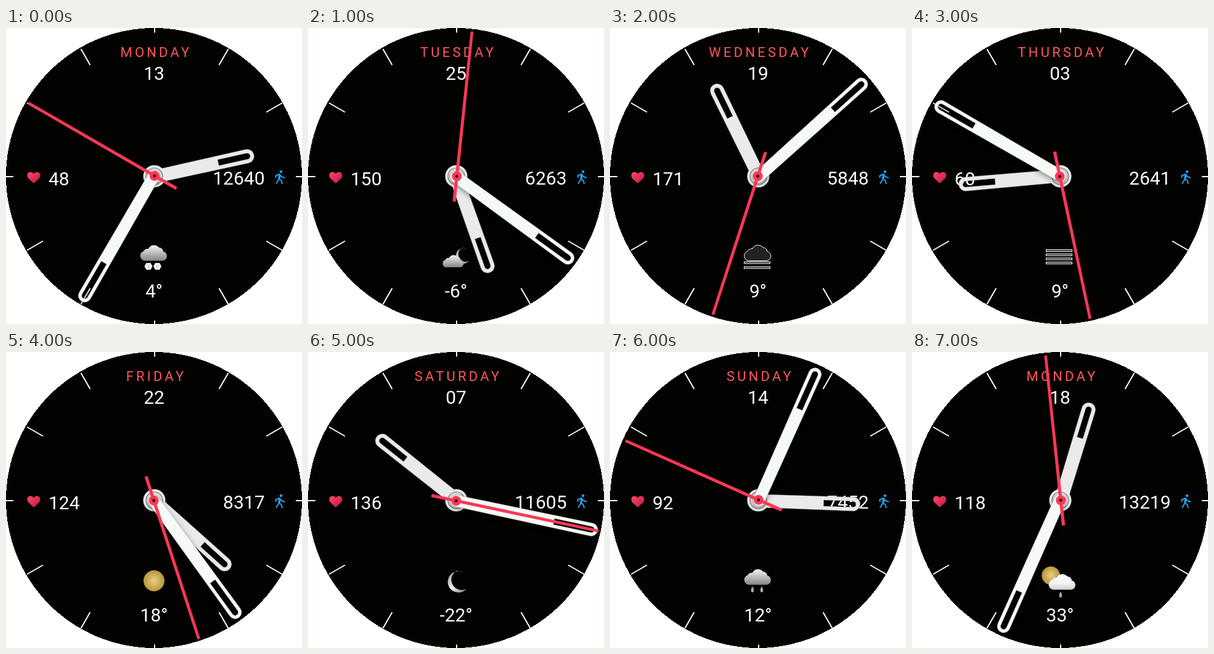
An HTML page that plays this animation: 480 by 480 pixels, repeating every 8000 ms.

```html
<!DOCTYPE html>
<html lang="en">
<head>
<meta charset="utf-8">
<title>Watch face</title>
<style>
  html, body { margin: 0; width: 100%; height: 100%; overflow: hidden; background: #fff; }
  svg { display: block; width: 100vw; height: 100vh; }
  text { font: 30px Roboto, sans-serif; fill: #fff; }
  #day { font-size: 22px; letter-spacing: 4.2px; fill: #ff5759; }
  .mid { text-anchor: middle; }
  .shade { filter: drop-shadow(0 3px 4px rgba(0, 0, 0, .4)); }
</style>
</head>
<body>
<svg viewBox="0 0 480 480">
  <defs>
    <linearGradient id="cloudFill" x2="0" y2="1">
      <stop stop-color="#fff"/><stop offset=".6" stop-color="#f2f2f2"/><stop offset="1" stop-color="#d0d0d0"/>
    </linearGradient>
    <linearGradient id="greyFill" x2="0" y2="1">
      <stop stop-color="#f4f4f4"/><stop offset="1" stop-color="#858585"/>
    </linearGradient>
    <linearGradient id="moonFill" x2="1" y2="1">
      <stop stop-color="#8c8c8c"/><stop offset=".5" stop-color="#efefef"/><stop offset="1" stop-color="#777"/>
    </linearGradient>
    <linearGradient id="heartFill" x2="1" y2="1">
      <stop stop-color="#fb4a66"/><stop offset="1" stop-color="#c01645"/>
    </linearGradient>
    <radialGradient id="sunFill">
      <stop stop-color="#e8d184"/><stop offset="1" stop-color="#b8963c"/>
    </radialGradient>
    <path id="cloud" d="M8 27A8 8 0 0 1 6 11.500A8 8 0 0 1 14 7.500A10 10 0 0 1 31 5.500A7 7 0 0 1 38 12A7.600 7.600 0 0 1 36 27Z"/>
    <path id="crescent" d="M9-14A16 16 0 1 0 15 11A15 15 0 0 1 0-16Z"/>
  </defs>

  <circle cx="240" cy="240" r="240" fill="#020201" shape-rendering="crispEdges"/>
  <g id="ticks" stroke="#fff" stroke-width="2"></g>

  <text id="day" class="mid" x="243.500" y="47"></text>
  <text id="date" class="mid" x="240" y="84"></text>
  <text id="pulse" x="69" y="255"></text>
  <text id="steps" x="419.500" y="254" text-anchor="end"></text>
  <text id="temp" class="mid" x="240" y="437"></text>

  <path fill="url(#heartFill)" d="M45 252L36.500 244C33 240.500 34 234 39.500 233.500Q43 233.500 45 236.500Q47 233.500 50.500 233.500C56 234 57 240.500 53.500 244Z"/>
  <g stroke="#22a2f2" stroke-width="2" fill="none" stroke-linejoin="round">
    <circle cx="446" cy="233" r="2.200" fill="#22a2f2" stroke="none"/>
    <path d="M437.500 243V239.500L443.500 237L446.500 241L452 243M444 238L442 246L438 252.500M442.500 244.500L446.500 247.500L448 253"/>
    <path d="M444 237.500L442.800 244.500" stroke-width="3.500"/>
  </g>
  <g id="weather"></g>

  <g transform="translate(240.5 240.5)">
    <path id="hour" fill="#ebe9ea" stroke="#aaa" stroke-width=".5" fill-rule="evenodd"/>
    <circle r="18" fill="#eeeded"/>
    <circle r="13.500" fill="#e2e1e1" stroke="#77797a" stroke-width="1.200"/>
    <g class="shade">
      <path id="minute" fill="#f6faf6" stroke="#aaa" stroke-width=".5" fill-rule="evenodd"/>
    </g>
    <g id="second" fill="#fb3856">
      <path d="M-2.600 41L-2.300-236H2.300L2.600 41Z"/>
      <circle r="8"/>
      <circle r="2.400" fill="#26080d"/>
    </g>
  </g>
</svg>
<script>
const $ = id => document.getElementById(id);
const use = (id, x, y, attrs, scale = 1) =>
  `<use href="#${id}" transform="translate(${x} ${y}) scale(${scale})" ${attrs}/>`;
const bars = (y, n, step) => Array.from({ length: n }, (_, i) =>
  `<rect x="217.500" y="${y + i * step}" width="42" height="3" fill="#333" stroke="#fff" stroke-width="1"/>`).join('');
const drop = (x, y) =>
  `<path d="M${x} ${y}c-8 13 8 13 0 0" fill="#a4a7a9"/>`;
const flake = x =>
  `<path d="M${x - 3.5} 381h7l3 5.500-3 5.500h-7l-3-5.500z" fill="#f4f4f4"/>
   <path d="M${x - 2} 384l4 5m0-5l-4 5" stroke="#c4c4c4"/>`;
const sun = (x, y, r) => `<circle cx="${x}" cy="${y}" r="${r}" fill="url(#sunFill)"/>`;
const grey = 'fill="url(#greyFill)"', white = 'fill="url(#cloudFill)"', moon = 'fill="url(#moonFill)"';

const icons = {
  snow: use('cloud', 217, 350.5, grey) + flake(231) + flake(245.5),
  cloudyNight: use('crescent', 250, 369, moon, .78) + use('cloud', 218, 367, grey, .78),
  fog: use('cloud', 217, 350.5, 'fill="#222" stroke="#fff"') + bars(379, 2, 8),
  mist: bars(359.5, 4, 6.7),
  sunny: sun(240, 371, 17),
  night: use('crescent', 241, 372, moon, 1.08),
  rain: use('cloud', 217, 350.5, grey) + drop(231, 380) + drop(246, 380),
  sunShower: sun(225.2, 362.5, 14.8) + use('cloud', 221, 358.5, white) + drop(241, 388.5),
};

// day, date, pulse, steps, temperature, weather, hour, minute, second
const scenes = [
  ['MONDAY', '13', 48, 12640, 4, 'snow', 2, 35, 50],
  ['TUESDAY', '25', 150, 6263, -6, 'cloudyNight', 5, 21, 1],
  ['WEDNESDAY', '19', 171, 5848, 9, 'fog', 11, 8, 33],
  ['THURSDAY', '03', 60, 2641, 9, 'mist', 8, 50, 28],
  ['FRIDAY', '22', 124, 8317, 18, 'sunny', 4, 24, 27],
  ['SATURDAY', '07', 136, 11605, -22, 'night', 10, 17, 17],
  ['SUNDAY', '14', 92, 7452, 12, 'rain', 3, 4, 49],
  ['MONDAY', '18', 118, 13219, 33, 'sunShower', 12, 34, 59],
];

// Hand pointing up, with a see-through slot near its tip
const handPath = (len, slot, base, tip) =>
  `M${-base} 0L${-tip} ${-len}A${tip} ${tip} 0 0 1 ${tip} ${-len}L${base} 0A${base} ${base} 0 0 1 ${-base} 0Z` +
  `M-5 ${-slot}V${-len}A5 5 0 0 1 5 ${-len}V${-slot}Z`;
$('hour').setAttribute('d', handPath(154, 106, 10.5, 11.2));
$('minute').setAttribute('d', handPath(224, 162, 9.3, 10.5));

for (let i = 0; i < 12; i++) {
  const inner = i % 3 ? 209 : i % 6 ? 229 : 233.5;
  const outer = i % 3 ? 239 : 241;
  $('ticks').innerHTML +=
    `<path d="M0 ${-inner}V${-outer}" transform="translate(241 241) rotate(${i * 30})"/>`;
}

// The hands sit slightly to the right of their pivot
const turn = (id, deg) => $(id).setAttribute('transform', `rotate(${deg}) translate(.8 0)`);

function show([day, date, pulse, steps, temp, weather, h, m, s]) {
  $('day').textContent = day;
  $('date').textContent = date;
  $('pulse').textContent = pulse;
  $('steps').textContent = steps;
  $('temp').textContent = temp + '°';
  $('weather').innerHTML = icons[weather];
  turn('hour', h * 30 + m / 2);
  turn('minute', m * 6);
  turn('second', s * 6);
}

let current = 0;
show(scenes[0]);
const start = performance.now();

function tick() {
  const i = Math.floor(Math.max(0, performance.now() - start) / 1000) % scenes.length;
  if (i !== current) show(scenes[current = i]);
  requestAnimationFrame(tick);
}
requestAnimationFrame(tick);
</script>
</body>
</html>
```
